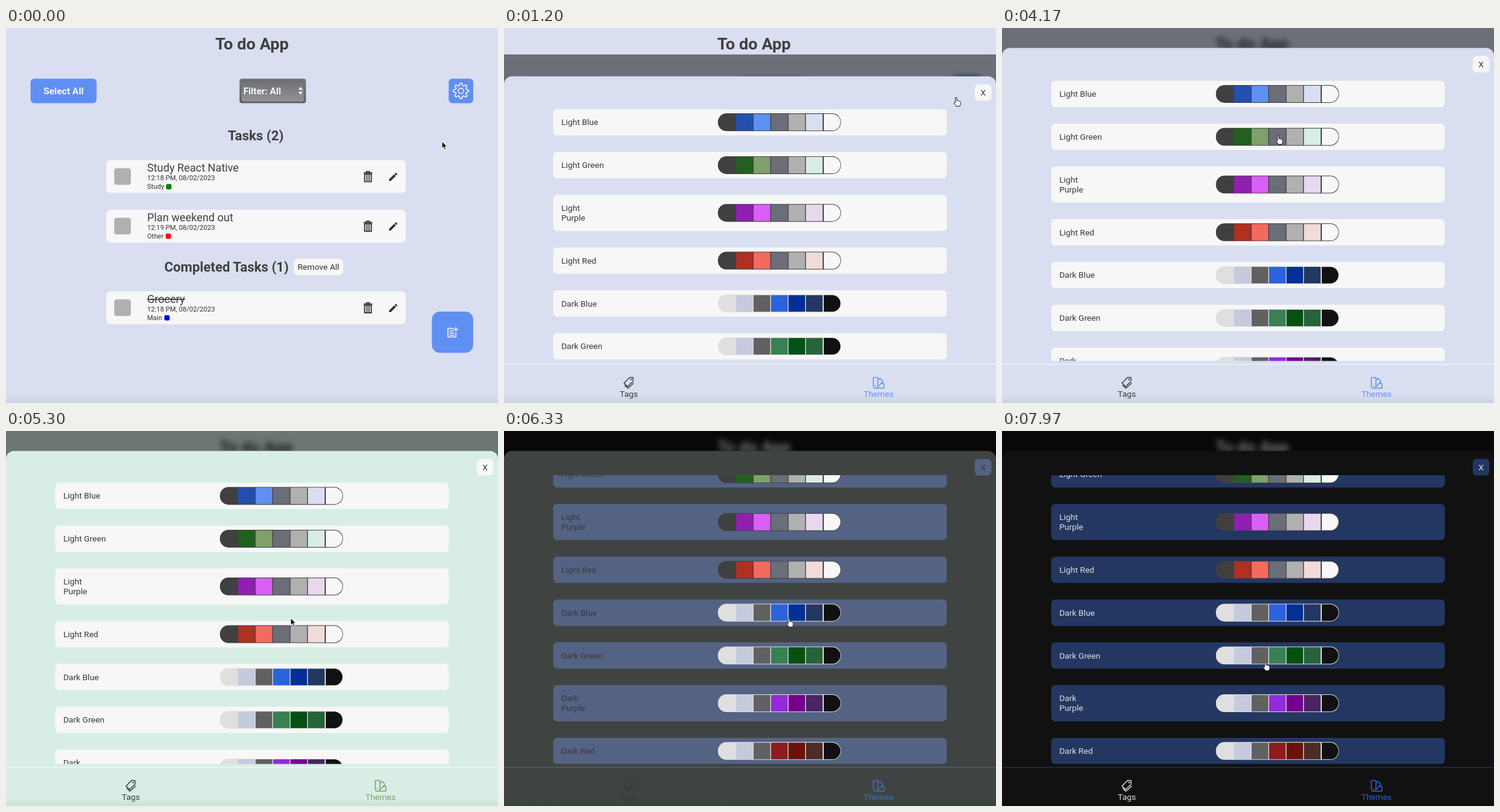
An HTML page for the animation above (8 s loop, 800 by 611 pixels).

```html
<!DOCTYPE html>
<html lang="en">
<head>
<meta charset="utf-8">
<title>To do App</title>
<style>
  html, body { margin: 0; width: 100%; height: 100%; overflow: hidden; }
  body { position: relative; background: var(--page); }
  svg { position: absolute; left: 0; top: 0; width: 800px; height: 611px; overflow: hidden; }
  text { font-family: Roboto, sans-serif; white-space: pre; }
  #veil { position: absolute; left: 0; top: -3.5px; width: 800px; height: 640px;
    background: rgba(0, 0, 0, .5); backdrop-filter: blur(5px); }
  .b { font-weight: 700; }
  .mid { text-anchor: middle; }
  .line { fill: none; stroke: currentColor; stroke-width: 1.5; stroke-linejoin: round; stroke-linecap: round; }
</style>
</head>
<body>
<svg id="app"></svg>
<div id="veil"></div>
<svg id="top"></svg>
<script>
const $ = id => document.getElementById(id);
const INK = '#404040', PAPER = '#f7f7f7', BLUE = '#608ff3';
const rect = (x, y, w, h, r, fill) =>
  `<rect x="${x}" y="${y}" width="${w}" height="${h}" rx="${r}" fill="${fill}"/>`;
const text = (x, y, size, str, fill = INK, cls = '', more = '') =>
  `<text x="${x}" y="${y}" font-size="${size}" fill="${fill}" class="${cls}" ${more}>${str}</text>`;
const at = (x, y, body, more = '') => `<g transform="translate(${x} ${y})" ${more}>${body}</g>`;
const line = (d, w = 1.5) => `<path class="line" d="${d}" style="stroke-width:${w}"/>`;

// ---- main page ----
const trash = line('M-6.6-6.2H6.6M-2.6-6.4V-8.4H2.6V-6.4M-5.6-4.2V8.2H5.6V-4.2z', 1.7) +
  line('M-2.6-3V7M0-3V7M2.6-3V7', 1.3);
const pencil = '<path transform="scale(.75)" fill="currentColor" d="M3 17.25V21h3.75L17.81 9.94l-3.75-3.75zM20.71 7.04a1 1 0 0 0 0-1.41l-2.34-2.34a1 1 0 0 0-1.41 0l-1.83 1.83 3.75 3.75z"/>';

function task(y, name, time, tag, color, tagX, done) {
  return at(0, y,
    rect(163, 0, 487, 53.4, 7, PAPER) + rect(176, 13.3, 27, 27, 4, '#b0b0b0') +
    text(229.5, 18.8, 17.8, name, INK, '', done ? 'text-decoration="line-through"' : '') +
    text(229.5, 33.2, 11, time + ' PM, 08/02/2023', '#333') +
    text(229.5, 47, 11, tag, '#333') + rect(tagX, 39, 8.6, 8.6, 2, color) +
    at(588.6, 27, trash, 'color="#333"') + at(620.6, 18.3, pencil, 'color="#333"'));
}

function gearPath() {
  let d = '';
  for (let i = 0; i < 96; i++) {
    const a = i / 96 * 2 * Math.PI;
    const r = 10.8 + 1.9 * Math.max(-1, Math.min(1, 1.6 * Math.cos(8 * a)));
    d += (i ? 'L' : 'M') + (r * Math.cos(a)).toFixed(2) + ' ' + (r * Math.sin(a)).toFixed(2);
  }
  return d + 'zM4.3 0A4.3 4.3 0 1 1-4.3 0A4.3 4.3 0 1 1 4.3 0z';
}

$('app').innerHTML = `
  <defs>
    <linearGradient id="rim" x2="0" y2="1"><stop stop-color="#77787b"/><stop offset="1" stop-color="#606165"/></linearGradient>
    <linearGradient id="face" x2="0" y2="1"><stop stop-color="#6c6d70"/><stop offset="1" stop-color="#929395"/></linearGradient>
  </defs>` +
  text(400, 35, 26.67, 'To do App', 'var(--title)', 'b mid', 'id="title"') +
  rect(40, 82.5, 107.3, 40, 6, BLUE) + text(93.6, 107.6, 15.3, 'Select All', PAPER, 'b mid') +
  '<g id="filter">' + rect(379.7, 82.5, 108, 40, 4, 'url(#rim)') +
  rect(383, 84, 101.4, 35.5, 3, 'url(#face)') + text(386, 107.6, 15.1, 'Filter: All', PAPER, 'b') +
  '<path fill="#f7f7f7" d="M475.3 100.8l3.6-5 3.6 5zM475.3 103.8l3.6 5 3.6-5z"/></g>' +
  '<g id="gear">' + `<rect id="gearBox" x="-20" y="-20" width="40" height="40" rx="6"/>` +
  `<g color="${PAPER}">${line(gearPath(), 1.6)}</g></g>` +
  text(406, 183, 21.8, 'Tasks (2)', INK, 'b mid') +
  task(215.3, 'Study React Native', '12:18', 'Study', '#008000', 260.4) +
  task(296, 'Plan weekend out', '12:19', 'Other', '#f00', 259.6) +
  text(257.5, 396.8, 21.8, 'Completed Tasks (1)', INK, 'b') +
  rect(468, 375.7, 80.2, 27, 7, PAPER) + text(508, 393.9, 13.6, 'Remove All', '#333', 'mid') +
  task(429, 'Grocery', '12:18', 'Main', '#00f', 257.5, true) +
  rect(692.5, 462, 67.2, 67.2, 13, BLUE) +
  at(726, 496, line('M1-6.5H-7.5V7.5H5.5V1M-4.5-2.5H1M-4.5 1H2.5M-4.5 4.5H2.5M5.5-8.5V-1.5M2-5H9', 1.6), `color="${PAPER}"`);

// ---- themes sheet ----
const light = (a, b, c) => [INK, a, b, '#6b6e79', '#b0b0b0', c, PAPER];
const dark = (a, b, c) => ['#dfdfdf', '#c5cadd', '#616161', a, b, c, '#111'];
const themes = [
  ['Light Blue', light('#234fb1', BLUE, '#d9dff0')],
  ['Light Green', light('#22601f', '#7f9f6b', '#d8eee5')],
  ['Light Purple', light('#911fb2', '#d95ff6', '#e7d8f0')],
  ['Light Red', light('#b03021', '#f36a61', '#f0dbd9')],
  ['Dark Blue', dark('#2a63db', '#032f96', '#243762')],
  ['Dark Green', dark('#398052', '#035113', '#27643a')],
  ['Dark Purple', dark('#922bd9', '#75008f', '#492562')],
  ['Dark Red', dark('#8c1d1f', '#6b1208', '#4d2b28')]
];

function pill(y, colors) {
  const cells = colors.map((c, i) => rect(349 + i * 28.4, y + 1, 27.1, 27, 0, c)).join('');
  return rect(347.8, y, 200, 29, 14, colors[0]) + `<g clip-path="inset(0 round 13px)">${cells}</g>`;
}

const cards = [];
let cardY = 86, list = '';
for (const [name, colors] of themes) {
  const tall = name.endsWith('Purple'), h = tall ? 58.9 : 42.9, mid = cardY + h / 2;
  const label = (s, y) => text(93.2, y + 4.8, 13.6, s, 'var(--text)');
  list += rect(80, cardY, 640, h, 6.5, 'var(--card)') +
    (tall ? name.split(' ').map((s, i) => label(s, mid - 8 + i * 16)).join('') : label(name, mid)) +
    pill(mid - 14.5, colors);
  cards.push([cardY, cardY + h]);
  cardY += h + 26.9;
}

const tagsIcon = line('M1-8.5H6.8V-2.6L-2 6.2L-7.8.4zM7.6.8L-1.5 9L-6.6 4.2', 1.4) +
  '<circle cx="3.6" cy="-5.2" r="1.2" fill="currentColor"/>';
const bookIcon = line('M-8.5-8.5H-1V5.2A3.7 3.7 0 0 1-8.5 5.2zM-1-4L2.6-7.2L7.2-2L-1 6.5M4.5 1.2H8.8V8.8H-4.8', 1.5) +
  '<circle cx="-4.8" cy="5" r="1" fill="currentColor"/>';
const tab = (x, icon, name, color) =>
  at(x, 578, icon, `style="color:${color}"`) + text(x, 601.3, 13.6, name, color, 'mid');

$('top').innerHTML = `
  <defs>
    <clipPath id="view"><rect x="0" y="72" width="800" height="470.6"/></clipPath>
    <clipPath id="round"><rect x="348.8" y="1" width="198" height="27" rx="13"/></clipPath>
    <linearGradient id="shade" x2="0" y2="1"><stop stop-opacity="0"/><stop offset="1" stop-opacity=".07"/></linearGradient>
  </defs>
  <g id="sheet">` + rect(0, 32.5, 800, 700, 13, 'var(--sheet)') +
  rect(765.5, 45.6, 27, 27, 6.5, 'var(--card)') + text(779, 64, 13.6, 'X', 'var(--text2)', 'mid') +
  `<g clip-path="url(#view)"><g id="list">${list}</g></g></g>
  <g id="nav">` + rect(0, 548, 800, 70, 0, 'var(--sheet)') + rect(0, 547.5, 800, 1.2, 0, 'var(--card)') +
  tab(203, tagsIcon, 'Tags', 'var(--text2)') + tab(609, bookIcon, 'Themes', 'var(--accent)') + '</g>' +
  rect(0, 598, 800, 13, 0, 'url(#shade)') +
  `<g id="cursor">
    <path id="arrow" stroke="#fff" stroke-width=".9" d="M0 0V11.2L2.6 8.8L4.3 12.8L6.3 12L4.6 8.1H8.2z"/>
    <path id="hand" fill="#fff" stroke="#111" stroke-width="1" stroke-linejoin="round" d="M-1 9V1.2a1.2 1.2 0 0 1 2.4 0V5.5q1.2-1 2 .4q1.3-.7 2 .6q1.6-.4 1.8 1v3q0 2-1.2 4H.5q-1.6-2.6-4-5.5q.6-1.8 2.5 0z"/>
  </g>`;
// Round the swatch ends in each pill's own coordinates.
document.querySelectorAll('#list g').forEach(g => {
  const end = g.previousElementSibling, y = +end.getAttribute('y');
  g.removeAttribute('clip-path');
  const [a, z] = [g.firstChild, g.lastChild].map(c => c.getAttribute('fill'));
  g.firstChild.outerHTML = `<path fill="${a}" d="M376 ${y + 1}H362a13.5 13.5 0 0 0 0 27H376z"/>`;
  g.lastChild.outerHTML = `<path fill="${z}" d="M520 ${y + 1}H533.6a13.5 13.5 0 0 1 0 27H520z"/>`;
});

// ---- motion ----
const clamp = v => Math.max(0, Math.min(1, v));
const smooth = (t, a, b) => { const u = clamp((t - a) / (b - a)); return u * u * (3 - 2 * u); };
// CSS "ease" curve
function ease(t, a, b) {
  const x = clamp((t - a) / (b - a));
  let lo = 0, hi = 1;
  for (let i = 0; i < 24; i++) {
    const s = (lo + hi) / 2;
    if (.75 * s * (1 - s) + s * s * s < x) lo = s; else hi = s;
  }
  const s = (lo + hi) / 2;
  return x === 0 ? 0 : x === 1 ? 1 : .3 * s * (1 - s) ** 2 + 3 * s * s * (1 - s) + s ** 3;
}
const rgb = h => [1, 3, 5].map(i => parseInt(h.substr(i, 2), 16));
const mix = (a, b, p) => `rgb(${rgb(a).map((v, i) => Math.round(v + (rgb(b)[i] - v) * p))})`;

const path = [
  [30, 709, 185], [620, 735, 113], [1670, 735, 113], [1900, 590, 540], [2110, 203, 582],
  [2330, 370, 434], [2530, 368, 434], [2710, 440, 97], [2920, 475, 523], [3100, 481, 470],
  [3270, 481, 470], [3630, 445, 123], [3970, 445, 123], [4170, 449, 175], [4600, 449, 175],
  [5170, 463, 305], [7100, 463, 305], [7830, 430, 374], [7960, 428, 376]
];
function pointer(t) {
  const i = path.findIndex(k => k[0] > t);
  if (i === 0) return path[0].slice(1);
  if (i < 0) return path[path.length - 1].slice(1);
  const [t0, x0, y0] = path[i - 1], [t1, x1, y1] = path[i], p = smooth(t, t0, t1);
  return [x0 + (x1 - x0) * p, y0 + (y1 - y0) * p];
}
const move = (id, x, y, more = '') => $(id).setAttribute('transform', `translate(${x} ${y})${more}`);

function draw(t) {
  const wide = t >= 800 ? 1 : 0, hover = ease(t, 420, 720);
  move('title', 6.5 * wide, 0);
  move('filter', 6.7 * wide, 0);
  move('gear', 739.8 + 13 * wide, 102.5, ` scale(${1 + .2 * hover})`);
  $('gearBox').setAttribute('fill', mix(BLUE, '#234fb1', hover));

  const drop = 611 * (1 - ease(t, 868, 1368));
  $('veil').style.transform = `translateY(${drop < 611 ? drop : 640}px)`;
  move('sheet', 0, drop);
  move('nav', 0, Math.max(0, drop - 516));
  const scroll = 106.7 * smooth(t, 5240, 6030);
  move('list', 0, -scroll);

  const green = ease(t, 4420, 4720), night = ease(t, 6190, 6490), isDark = t >= 6200;
  const fade = (a, b, c) => night ? mix(b, c, night) : mix(a, b, green);
  const sheet = fade('#d9dff0', '#d8eee5', '#111111');
  const vars = {
    page: isDark ? '#111' : sheet,
    title: isDark ? '#dfdfdf' : INK,
    sheet,
    card: fade(PAPER, PAPER, '#243762'),
    accent: fade(BLUE, '#7f9f6b', '#2a63db'),
    text: mix('#383838', '#dfdfdf', smooth(t, 6850, 7900)),
    text2: mix('#383838', '#dfdfdf', smooth(t, 6600, 7500))
  };
  for (const k in vars) document.documentElement.style.setProperty('--' + k, vars[k]);

  const [x, y] = pointer(t);
  const onCard = x > 80 && x < 720 && y < 542 && cards.some(([a, b]) => y + scroll > a && y + scroll < b);
  const hand = t <= 1670 ? x > 719 && y < 123 : y > 548 || onCard;
  move('cursor', x, y);
  $('hand').style.display = hand ? '' : 'none';
  $('arrow').style.display = hand ? 'none' : '';
}

const start = performance.now();
function tick() {
  draw((performance.now() - start) % 8000);
  requestAnimationFrame(tick);
}
tick();
</script>
</body>
</html>
```
